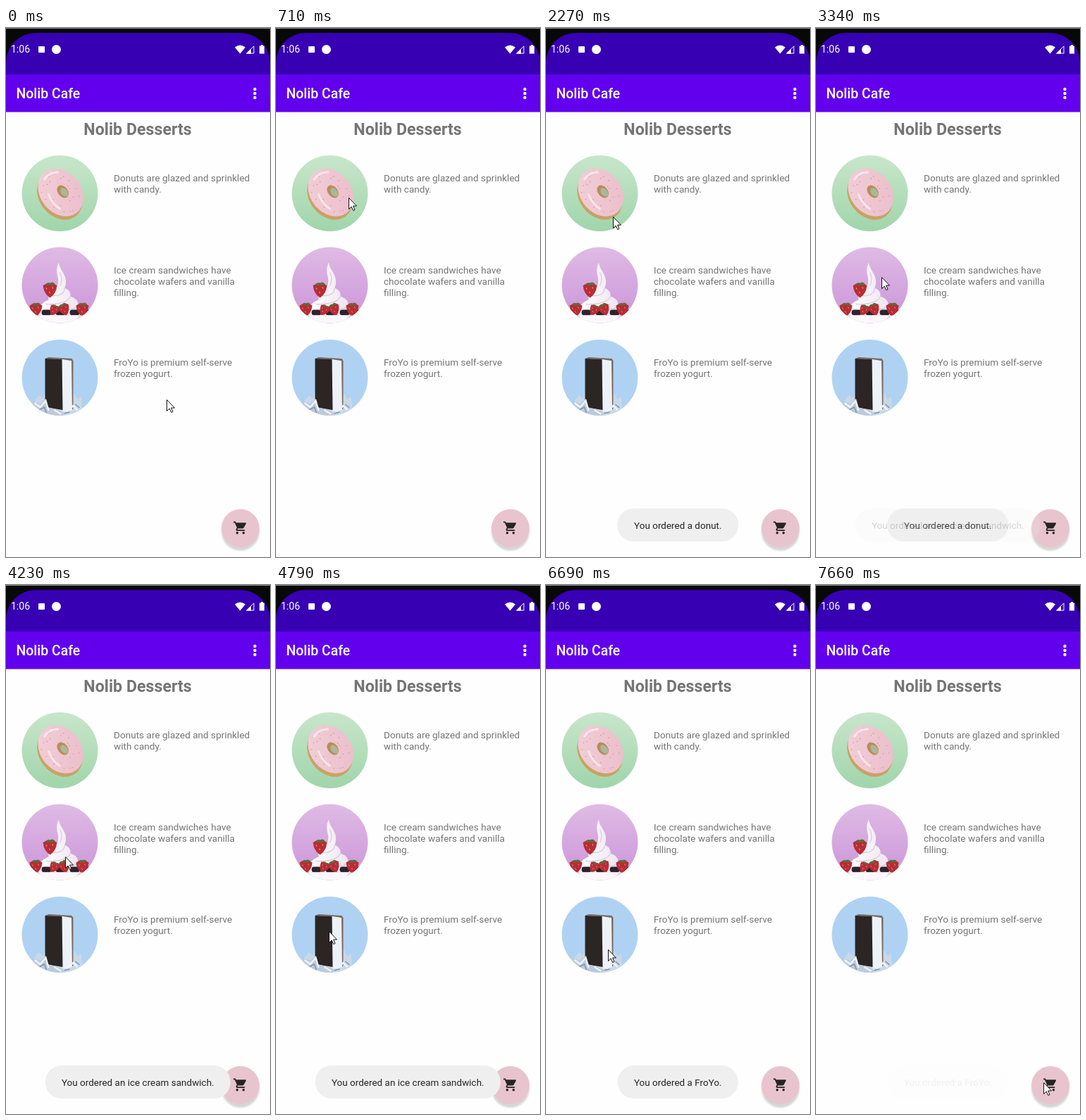
An HTML page for the animation above (8000 ms loop, 375x752 px).

```html
<!DOCTYPE html>
<html lang="en">
<head>
<meta charset="utf-8">
<title>Dessert menu</title>
<style>
html, body { margin: 0; width: 100%; height: 100%; overflow: hidden; background: #fefefe; }
svg { display: block; font: 13.6px Roboto, sans-serif; }
.bar { fill: #fff; }
.body { fill: #757575; }
.toast text { font-size: 13.5px; fill: #242424; text-anchor: middle; }
.toast rect { fill: #efefef; }
</style>
</head>
<body>
<svg width="375" height="752" viewBox="0 0 375 752">
  <defs>
    <linearGradient id="mint" x2="0" y2="1"><stop stop-color="#c8e6ca"/><stop offset="1" stop-color="#a0d5ab"/></linearGradient>
    <linearGradient id="lilac" x2="0" y2="1"><stop stop-color="#dfbbe5"/><stop offset=".9" stop-color="#cd98da"/></linearGradient>
    <linearGradient id="glaze" x2="1" y2="1"><stop stop-color="#f1d0d8"/><stop offset="1" stop-color="#ebbcc9"/></linearGradient>
    <linearGradient id="cream" x2="1" y2="0"><stop stop-color="#fff"/><stop offset="1" stop-color="#eee4f0"/></linearGradient>
    <clipPath id="disc"><circle r="54"/></clipPath>
    <filter id="blur"><feGaussianBlur stdDeviation="1"/></filter>
    <g id="berry">
      <path d="M-9-5Q0-11 9-5Q8 6 0 11Q-8 6-9-5Z" fill="#b92c33"/>
      <path d="M-5-2l1 2M3-3l1 2M-1 3l1 2" stroke="#e59a90"/>
      <path d="M-7-6Q-2-10 0-8Q4-11 7-6Q1-4-7-6Z" fill="#5e6a3a"/>
    </g>
  </defs>

  <!-- Status bar and toolbar -->
  <path d="M0 0H375V66H0Z" fill="#080808"/>
  <path d="M0 0H375V1H0Z" fill="#8a8a8a"/>
  <path d="M0 66V49A42 42 0 0 1 42 7H333A42 42 0 0 1 375 49V66Z" fill="#3700b3"/>
  <path d="M0 66H375V119.500H0Z" fill="#6200ee"/>
  <g class="bar">
    <text x="7" y="35" font-size="14">1:06</text>
    <rect x="46" y="26" width="9" height="9" rx="1"/>
    <circle cx="71.500" cy="30.500" r="6.500"/>
    <path d="M325 27.500Q332.500 21.500 340 27.500L332.500 36.500Z"/>
    <path d="M341 36.500L348 29.500V36.500Z"/>
    <path d="M341.800 36L352 25.800V36Z" fill="none" stroke="#fff"/>
    <path d="M360 25.500H362V24H365V25.500H367V36.500H360Z"/>
    <text x="14.500" y="100" font-size="19.4" font-weight="500">Nolib Cafe</text>
    <path d="M353.500 87v0m0 6v0m0 6v0" stroke="#fff" stroke-width="4.400" stroke-linecap="round"/>
  </g>

  <g class="body">
    <text x="187" y="152" font-size="23.2" font-weight="700" text-anchor="middle">Nolib Desserts</text>
    <text y="218"><tspan x="153">Donuts are glazed and sprinkled</tspan><tspan x="153" dy="16">with candy.</tspan></text>
    <text y="349"><tspan x="153">Ice cream sandwiches have</tspan><tspan x="153" dy="16">chocolate wafers and vanilla</tspan><tspan x="153" dy="16">filling.</tspan></text>
    <text y="480"><tspan x="153">FroYo is premium self-serve</tspan><tspan x="153" dy="16">frozen yogurt.</tspan></text>
  </g>

  <!-- Donut -->
  <g transform="translate(76.500 235)">
    <circle r="54" fill="url(#mint)"/>
    <g transform="translate(1 0) rotate(-38)">
      <ellipse cx="-3" cy="2" rx="29" ry="37" fill="#c9a265"/>
      <ellipse cx="1" cy="-1" rx="29" ry="37" fill="url(#glaze)"/>
      <path id="sprinkles" stroke="#dc9db0" stroke-width="1.300"/>
      <ellipse cx="4" cy="0" rx="7" ry="10" fill="#b98d56"/>
      <ellipse cx="5" cy="2" rx="4.500" ry="7" fill="#a9b79b"/>
    </g>
    <path d="M-22-20Q-14-31-3-30M-16 2Q-10 16 0 22" fill="none" stroke="#f8e6ea" stroke-width="3" stroke-linecap="round"/>
  </g>

  <!-- Frozen yogurt -->
  <g transform="translate(76.500 365.500)">
    <circle r="54" fill="url(#lilac)"/>
    <g clip-path="url(#disc)">
      <path d="M-32 43Q-30 25-16 21Q-18 12-8 6Q0 0-3-12Q-6-22-2-32Q0-24 5-17Q11-7 7 4Q16 8 15 16Q27 20 26 29Q30 36 29 43Z" fill="url(#cream)"/>
      <path d="M-12 15Q6 16 7 4M-20 27Q10 28 15 16M-27 36Q18 39 26 29M0-18Q5-8 0 1" fill="none" stroke="#d9cbdd" stroke-width="1.300"/>
      <path d="M-42 39H42" stroke="#2c232e" stroke-width="8" stroke-linecap="round" stroke-dasharray="6 14" stroke-dashoffset="-20"/>
      <use href="#berry" transform="translate(-14 6) scale(1.100)"/>
      <use href="#berry" x="-34" y="34"/>
      <use href="#berry" transform="translate(-8 35) rotate(30) scale(.8)"/>
      <use href="#berry" transform="translate(6 34) rotate(-20) scale(.9)"/>
      <use href="#berry" x="32" y="34"/>
      <path d="M-54 43H54V54H-54Z" fill="#ebd9ef"/>
      <path d="M-30 43H27L20 54H-22Z" fill="#fbf8fc"/>
    </g>
  </g>

  <!-- Ice cream sandwich -->
  <g transform="translate(76.500 497)">
    <circle r="54" fill="#afd2f3"/>
    <g clip-path="url(#disc)">
      <path d="M-38 54V36L-30 25L-24 30L-20 18L-10 36L12 32L20 22L25 31L30 27L33 54Z" fill="#c9d8e8"/>
      <path d="M3-26L17-24L19 46L4 49Z" fill="#edf2f6"/>
      <path d="M-21-27L-16-29L17-27L19-24V44L17.500 46L16.500-24L4-26Z" fill="#7b6a62"/>
      <path d="M-21-27L3-26L4 46L-21 42Z" fill="#2b2524"/>
      <path d="M-40 33L-28 37L-20 30L-18 42L-5 45L6 50L2 56H-34Z" fill="#bccadb"/>
      <path d="M-36 36L-28 42L-20 33L-16 47M-8 46L2 52M10 48L19 40L25 46" fill="none" stroke="#eef4fa" stroke-width="2.500"/>
      <path d="M-30 46L-22 42L-19 50M6 51L14 49M22 38L28 43" fill="none" stroke="#8194a8" stroke-width="1.500"/>
    </g>
  </g>

  <!-- Cart button -->
  <circle cx="333" cy="716" r="27" fill="#ccc" filter="url(#blur)" opacity=".8"/>
  <circle cx="333" cy="711" r="27" fill="#e8c4ce"/>
  <path transform="translate(322.100 699.700) scale(.9)" fill="#252525" d="M7 18a2 2 0 1 0 0 4a2 2 0 1 0 0-4ZM1 2V4H3L6.600 11.600L5.250 14Q5 14.500 5 15Q5 17 7 17H19V15H7.400L7.200 14.600L8.100 13H15.500Q16.700 13 17.300 12L20.900 5.500Q21.300 4 20 4H5.200L4.300 2ZM17 18a2 2 0 1 0 0 4a2 2 0 1 0 0-4Z"/>

  <g id="toasts"></g>
  <path id="mouse" d="M.5.500V16.500L4.200 13L6.800 18.500L9 17.500L6.600 12H11.500Z" fill="#fff" stroke="#111"/>
</svg>
<script>
const LOOP = 8000, TICK = 140, MID = 187.3;
const byId = id => document.getElementById(id);
const mix = (a, b, p) => a + (b - a) * p;

// Pointer glides: first step, last step, destination
const start = [228, 528];
const glides = [
  [290, 290, 301, 437], [440, 560, 108, 247], [710, 830, 98, 234],
  [2270, 2270, 95, 268], [2390, 2760, 93, 354],
  [4230, 4350, 74, 417], [4500, 4790, 75, 492],
  [6690, 6690, 88, 518], [6840, 7080, 283, 688],
  [7230, 7230, 309, 702], [7380, 7530, 323, 707]
];

const toasts = [
  { name: 'a donut', width: 172, enter: [1260, 1690], exit: [3340, 3650], rest: 0 },
  { name: 'an ice cream sandwich', width: 263, enter: [3190, 3650], exit: [5370, 5670], rest: 0 },
  { name: 'a FroYo', width: 171, enter: [5370, 5820], exit: [7380, 7660], rest: .06 }
];

// Progress 0..1 in even held steps; the first lands on `from`, the last on `to`
function progress(t, from, to) {
  if (t < from) return 0;
  if (t >= to) return 1;
  const gaps = Math.round((to - from) / TICK);
  return (Math.floor((t - from) / (to - from) * gaps) + 1) / (gaps + 1);
}

function pointerAt(t) {
  return glides.reduce(([x, y], [from, to, toX, toY]) => {
    const p = progress(t, from, to);
    return [mix(x, toX, p), mix(y, toY, p)];
  }, start);
}

function opacityAt(t, { enter, exit, rest }) {
  return progress(t, ...enter) ** 1.2 * mix(1, rest, progress(t, ...exit) ** 2);
}

function sprinkle(count) {
  let seed = 7, d = '';
  const random = () => (seed = seed * 16807 % 2147483647) / 2147483647;
  for (let i = 0; i < count; i++) {
    const angle = i * 2.4, r = mix(.45, .9, random()), turn = random() * 6;
    d += `M${1 + 28 * r * Math.cos(angle)} ${36 * r * Math.sin(angle) - 1}l${2 * Math.cos(turn)} ${2 * Math.sin(turn)}`;
  }
  byId('sprinkles').setAttribute('d', d);
}

function draw() {
  const t = performance.now() % LOOP;
  const [x, y] = pointerAt(t).map(Math.round);
  byId('mouse').setAttribute('transform', `translate(${x} ${y})`);
  toasts.forEach((toast, i) => byId('toasts').children[i].setAttribute('opacity', opacityAt(t, toast)));
  requestAnimationFrame(draw);
}

byId('toasts').innerHTML = toasts.map(({ name, width }) => `<g class="toast">
  <rect x="${MID - width / 2}" y="683" width="${width}" height="47" rx="23"/>
  <text x="${MID}" y="712">You ordered ${name}.</text></g>`).join('');
sprinkle(22);
draw();
</script>
</body>
</html>
```
